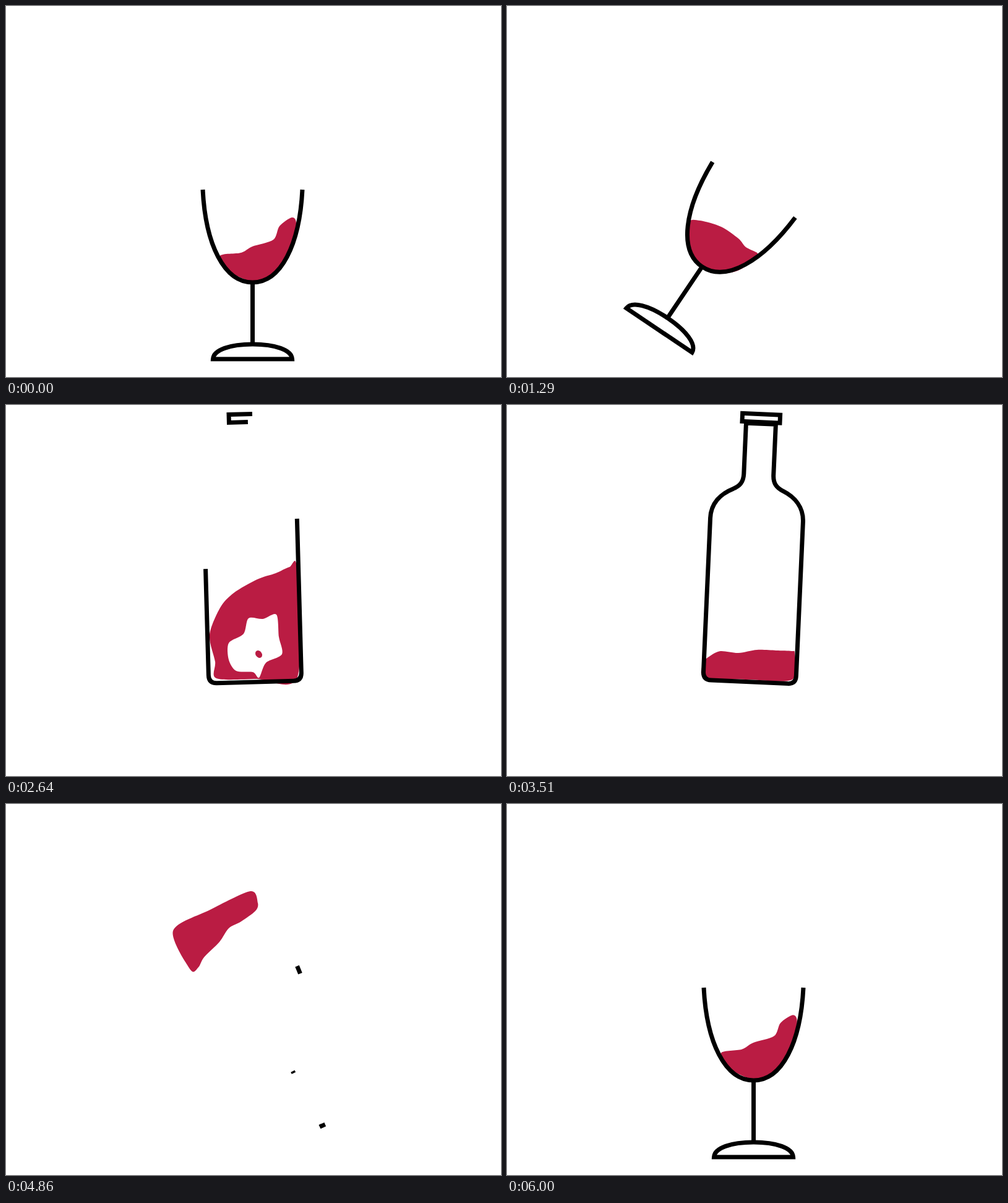
Write an HTML page that moves like this. It is 800x600 px and loops after 6030 ms.

```html
<!DOCTYPE html>
<html lang="en">
<head>
<meta charset="utf-8">
<title>Wine</title>
<style>
html, body { margin: 0; width: 100%; height: 100%; overflow: hidden; background: #fff; }
svg { display: block; }
.line { fill: none; stroke: #000; stroke-width: 7; stroke-miterlimit: 8; }
</style>
</head>
<body>
<svg width="800" height="600" viewBox="0 0 800 600">
  <path id="wine" fill="#ba1c43"/>
  <g id="splash">
    <path id="hole" fill="#fff"/>
    <ellipse cx="408.500" cy="403" rx="5" ry="6.500" fill="#ba1c43" transform="rotate(-35 408.500 403)"/>
  </g>
  <g id="glass" class="line">
    <path pathLength="1" d="M80.5-1C76 88 46 149 0 149S-76 88-80.500-1"/>
    <path pathLength="1" d="M0 149V248"/>
    <path pathLength="1" d="M0 249C36 249 63 258 64 273H-64C-63 258-36 249 0 249Z"/>
  </g>
  <g id="bottle" class="line">
    <path pathLength="1" d="M75-112V137Q75 150 62 150H-62Q-75 150-75 137V-112C-75-136-60-152-40-161C-30-166-24-172-24-186V-268H24V-186C24-172 30-166 40-161C60-152 75-136 75-112Z"/>
    <path pathLength="1" d="M0-270.500H-30.500V-283.500H30.500V-270.500Z"/>
  </g>
</svg>
<script>
const LOOP = 6030, STEP = 30, HALF = 3000, CX = 398.5, CY = 298;
const $ = id => document.getElementById(id);
const clamp = v => Math.max(0, Math.min(1, v));
const ramp = (t, from, length) => clamp((t - from) / length);

// Symmetric cubic-bezier ease with a long, slow start and end
function swing(x) {
  const p = 0.865;
  let lo = 0, hi = 1;
  for (let i = 0; i < 24; i++) {
    const s = (lo + hi) / 2, r = 1 - s;
    if (3 * p * s * r * r + 3 * (1 - p) * s * s * r + s ** 3 < x) lo = s;
    else hi = s;
  }
  return lo * lo * (3 - 2 * lo);
}

// Two half turns per loop, in degrees
function angleAt(t) {
  const T = Math.max(0, t - STEP);
  return 180 * (swing(clamp(T / HALF)) + swing(clamp(T / HALF - 1)));
}

function rotate([x, y], deg) {
  const a = deg * Math.PI / 180, c = Math.cos(a), s = Math.sin(a);
  return [x * c - y * s, x * s + y * c];
}

const pairs = list => list.reduce((out, v, i) => (i % 2 ? out[out.length - 1].push(v) : out.push([v]), out), []);

function oval(cy, rx, ry, start) {
  return Array.from({ length: 11 }, (_, i) => {
    const a = start + i * 2 * Math.PI / 11;
    return [CX + rx * Math.cos(a), cy + ry * Math.sin(a)];
  });
}

// A wine shape seen on the stage, stored in the turning frame
const key = (t, points) => ({
  t, points: points.map(([x, y]) => rotate([x - CX, y - CY], -angleAt(t)))
});
const hold = (k, t) => ({ t, points: k.points });

const inGlass = pairs([346,404, 380,399, 398,389, 432,378, 442,356, 462,342,
  469,352, 461,393, 439,431, 399,445, 361,429]);
const tilted = key(1290, pairs([294,349, 312,347, 346,357, 374,376, 386,390, 405,400,
  400,411, 373,428, 346,432, 312,421, 292,383]));
const burst = pairs([470,264, 471,440, 405,443, 340,442, 338,415,
  329,372, 346,328, 368,304, 406,282, 436,272, 458,262]);
const settled = pairs([465,402, 461,444, 390,444, 319,440, 318,416,
  328,406, 345,398, 374,401, 404,396, 435,397, 460,398]);
const leaning = pairs([417,414, 395,457, 330,430, 270,393, 269,380,
  279,373, 312,374, 345,385, 360,393, 384,396, 408,408]);
const clinging = key(4860, pairs([298,268, 270,205, 330,171, 395,141, 407,160,
  403,173, 380,190, 360,201, 345,223, 320,248, 311,264]));

const keys = [
  key(0, inGlass), tilted, hold(tilted, 2010),
  key(2370, oval(335, 60, 109, 0)),
  key(2640, burst), key(3510, settled), key(4230, leaning),
  clinging, hold(clinging, 5040),
  key(5400, oval(315, 55, 105, Math.PI)),
  key(5640, oval(332, 60, 112, Math.PI)),
  key(LOOP, inGlass)
];

const hole = pairs([360,385, 384,370, 392,345, 415,346, 437,339, 441,375,
  446,403, 420,417, 409,441, 399,432, 372,430, 360,412]);

function smooth(points) {
  const n = points.length, at = i => points[(i + n) % n];
  const f = v => v.toFixed(2);
  let d = "M" + points[0].map(f);
  for (let i = 0; i < n; i++) {
    const [a, b, c, e] = [at(i - 1), at(i), at(i + 1), at(i + 2)];
    const out = b.map((v, k) => f(v + (c[k] - a[k]) / 7));
    const into = c.map((v, k) => f(v - (e[k] - b[k]) / 7));
    d += `C${out} ${into} ${c.map(f)}`;
  }
  return d + "Z";
}

function wineAt(t, angle) {
  const i = keys.findIndex(k => k.t > t), a = keys[i - 1], b = keys[i];
  let u = ramp(t, a.t, b.t - a.t);
  u = u * u * (3 - 2 * u);
  return a.points.map(([x, y], j) => {
    const [bx, by] = b.points[j];
    const [px, py] = rotate([x + (bx - x) * u, y + (by - y) * u], angle);
    return [px + CX, py + CY];
  });
}

// Turns a vessel and draws only the first part of each of its lines
function pose(id, angle, part) {
  const g = $(id);
  g.setAttribute("transform", `translate(${CX} ${CY}) rotate(${angle})`);
  g.style.display = part > 0 ? "" : "none";
  g.style.strokeDasharray = part < 1 ? `${part} 2` : "none";
}

$("hole").setAttribute("d", smooth(hole));

function draw(now) {
  const t = Math.floor(now % LOOP / STEP) * STEP, T = t - STEP;
  const angle = angleAt(t);
  pose("glass", angle, T < HALF ? 1 - ramp(T, 1400, 650) : ramp(T, HALF + 1790, 1150));
  pose("bottle", angle - 180, Math.min(ramp(T, 1950, 1200), 1 - ramp(T, HALF + 1200, 600)));
  $("wine").setAttribute("d", smooth(wineAt(t, angle)));
  const size = clamp(1 - Math.abs(t - 2640) / 210);
  $("splash").style.display = size ? "" : "none";
  $("splash").setAttribute("transform", `translate(405 437) scale(${size}) translate(-405 -437)`);
}

const start = performance.now();
function tick() {
  draw(performance.now() - start);
  requestAnimationFrame(tick);
}
tick();
</script>
</body>
</html>
```
